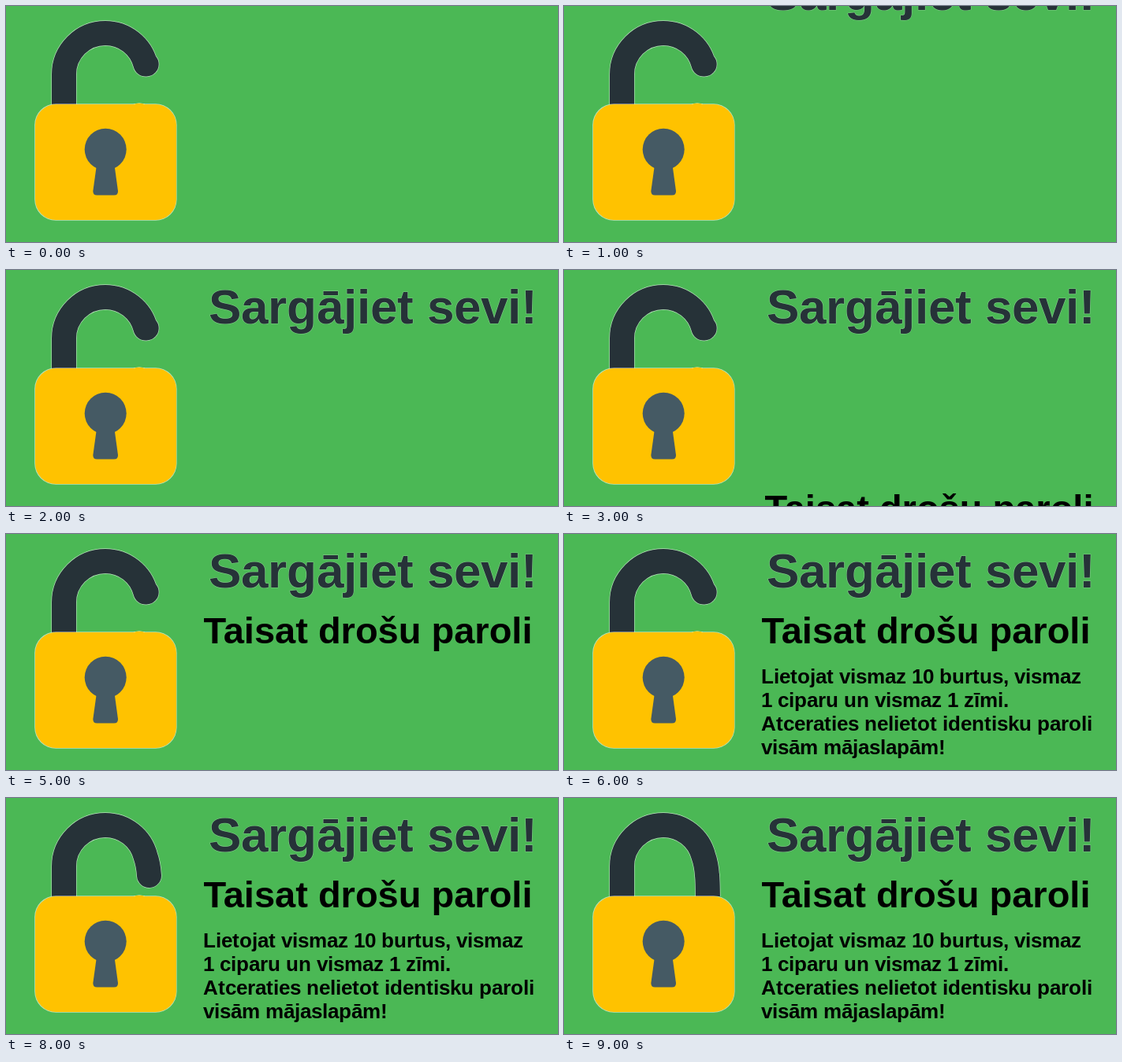
An HTML page with a canvas for the animation above (10000 ms loop, 700 by 300 pixels).

```html
<!DOCTYPE html>
<html lang="lv">
<head>
<meta charset="utf-8">
<title>Droša parole</title>
<style>
  html, body { margin: 0; width: 100%; height: 100%; overflow: hidden; background: #4bb855; }
  canvas { display: block; }
</style>
</head>
<body>
<canvas id="stage" width="700" height="300"></canvas>
<script>
const ctx = document.getElementById('stage').getContext('2d');
const GREEN = '#4bb855', DARK = '#263238', YELLOW = '#ffc200', SLATE = '#455a64';
const FRINGE = 'rgba(255,255,255,0.6)';
const STEP = 1000, STEPS = 10;

const BODY_LINES = [
  'Lietojat vismaz 10 burtus, vismaz',
  '1 ciparu un vismaz 1 zīmi.',
  'Atceraties nelietot identisku paroli',
  'visām mājaslapām!'
];

function setFont(size) {
  ctx.font = `bold ${size}px "Liberation Sans", Arial, sans-serif`;
}

// Letters advance by whole pixels.
function snappedText(text, x, y, outlined) {
  for (const ch of text) {
    if (outlined) ctx.strokeText(ch, x, y);
    ctx.fillText(ch, x, y);
    x += Math.round(ctx.measureText(ch).width);
  }
}

function drawTitle(step) {
  if (step < 1) return;
  setFont(62);
  ctx.fillStyle = DARK;
  ctx.strokeStyle = 'rgba(255,255,255,0.3)';
  ctx.lineWidth = 1.2;
  ctx.lineJoin = 'round';
  snappedText('Sargājiet sevi!', 257, step === 1 ? 5 : 68, true);
}

function drawHeading(step) {
  if (step < 3) return;
  const [x, y] = step === 3 ? [254.5, 319] : step === 4 ? [251.5, 235] : [250.5, 139];
  setFont(47);
  ctx.fillStyle = '#000';
  ctx.fillText('Taisat drošu paroli', x, y);
}

function drawBody(step) {
  if (step < 6) return;
  setFont(26);
  ctx.fillStyle = '#000';
  BODY_LINES.forEach((line, i) => snappedText(line, 250, 190 + i * 30));
}

function drawShackle(step) {
  const path = new Path2D();
  path.moveTo(73.5, 150);
  path.lineTo(73.5, 87);
  path.arc(126, 87, 52.5, Math.PI, -0.25);
  if (step === 6 || step < 6) path.lineTo(178.2, 74);
  else if (step === 7) path.lineTo(179.7, 83.5);
  else {
    path.quadraticCurveTo(180.5, 84, 181.5, 98.5);
    if (step === 9) path.quadraticCurveTo(182.5, 106, 182.5, 145);
  }
  ctx.save();
  ctx.beginPath();
  ctx.rect(0, 0, 250, 125);
  ctx.clip();
  ctx.lineCap = 'round';
  ctx.lineJoin = 'round';
  ctx.strokeStyle = FRINGE;
  ctx.lineWidth = 32.3;
  ctx.stroke(path);
  ctx.strokeStyle = DARK;
  ctx.lineWidth = 31;
  ctx.stroke(path);
  ctx.restore();
}

function roundedBox(x, y, w, h, r, color) {
  ctx.fillStyle = color;
  ctx.beginPath();
  ctx.roundRect(x, y, w, h, r);
  ctx.fill();
}

function drawCase(step) {
  roundedBox(36.2, 124.2, 180.4, 148.6, 27, FRINGE);
  if (step < 9) {
    ctx.fillStyle = YELLOW;
    ctx.strokeStyle = FRINGE;
    ctx.lineWidth = 1;
    ctx.beginPath();
    ctx.moveTo(162, 125);
    ctx.quadraticCurveTo(169, 122.4, 176, 125);
    ctx.stroke();
    ctx.fill();
  }
  roundedBox(37, 125, 179, 147, 26.5, YELLOW);

  ctx.fillStyle = SLATE;
  ctx.beginPath();
  ctx.arc(126.2, 182.3, 26.5, 0, Math.PI * 2);
  ctx.fill();
  ctx.beginPath();
  ctx.moveTo(114.8, 203);
  ctx.lineTo(137.6, 203);
  ctx.lineTo(142, 235);
  ctx.quadraticCurveTo(142.4, 240.5, 137, 240.5);
  ctx.lineTo(115.4, 240.5);
  ctx.quadraticCurveTo(110, 240.5, 110.4, 235);
  ctx.closePath();
  ctx.fill();
}

function draw(now) {
  const step = Math.floor(now / STEP) % STEPS;
  ctx.fillStyle = GREEN;
  ctx.fillRect(0, 0, 700, 300);
  drawShackle(step);
  drawCase(step);
  drawTitle(step);
  drawHeading(step);
  drawBody(step);
}

let start;
function tick(now) {
  start ??= now;
  draw(now - start);
  requestAnimationFrame(tick);
}
draw(0);
requestAnimationFrame(tick);
</script>
</body>
</html>
```
